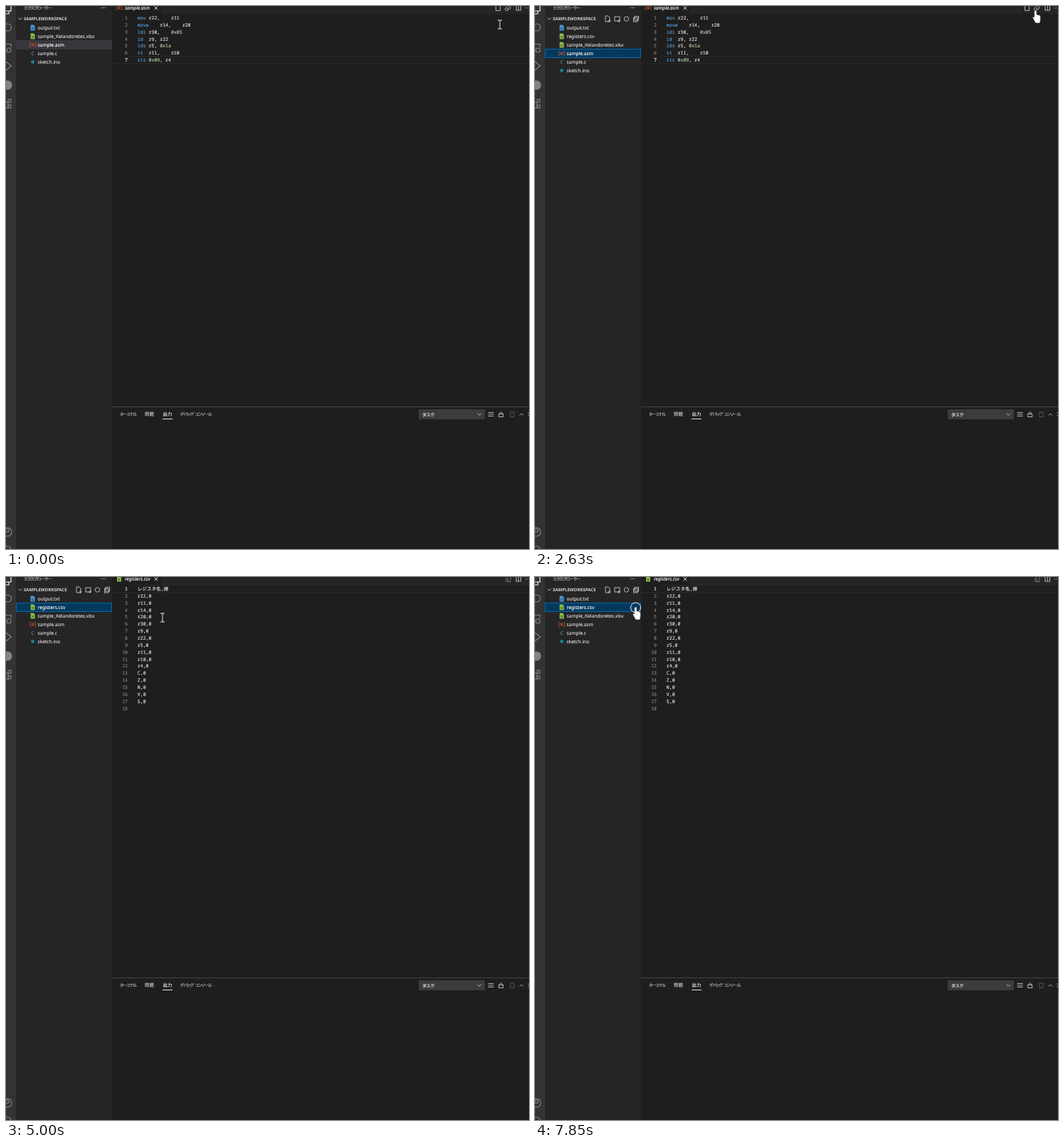
An HTML page for the animation above (8 s loop, 735 by 762 pixels).

```html
<!DOCTYPE html>
<html lang="ja">
<head>
<meta charset="utf-8">
<title>Editor session</title>
<style>
  html, body { margin: 0; width: 100%; height: 100%; overflow: hidden; background: #1e1e1e; }
  svg { display: block; width: 735px; height: 762px; }
  text { font: 6.6px "Noto Sans", "Open Sans", sans-serif; color: #d8d8d8; fill: currentColor;
         stroke: currentColor; stroke-width: .15px; white-space: pre; text-rendering: geometricPrecision; }
  tspan { fill: currentColor; stroke: currentColor; }
  .jp { font-family: "Noto Sans CJK JP", "Noto Sans CJK", sans-serif; font-feature-settings: "palt";
        font-size: 5.9px; letter-spacing: -.7px; word-spacing: 1.4px; color: #c0c0c0; }
  .full { font-size: 6.4px; letter-spacing: 0; }
  .tip { font-size: 9.8px; letter-spacing: -1.9px; color: #eee; }
  .tip tspan { letter-spacing: 0; }
  .head { font-weight: 700; font-size: 6.05px; stroke: none; }
  .code { font-family: "Noto Sans Mono", "DejaVu Sans Mono", "Noto Sans CJK JP", monospace;
          font-size: 6.56px; color: #e4e4e4; }
  .num { color: #858585; text-anchor: end; }
  .tab { font-style: italic; }
  .lit { color: #fff; }
  .kw { color: #569cd6; }
  .hex { color: #b5cea8; }
  .c { color: #519aba; text-anchor: middle; }
  .icon { fill: none; stroke: #c5c5c5; stroke-width: .9; }
  .side { fill: none; stroke: #858585; stroke-width: 1.1; }
  .dots { fill: none; stroke: #c5c5c5; stroke-width: 1.3; stroke-linecap: round; stroke-dasharray: 0 2.6; }
</style>
</head>
<body>
<svg viewBox="0 0 735 762" xmlns="http://www.w3.org/2000/svg">
  <defs>
    <path id="page" d="M-3 -4H1L3 -2V4H-3Z"/>
    <path id="chevron" d="M-2.5 -1.5L0 1L2.5 -1.5"/>
    <path id="cross" d="M-2.4 -2.4L2.4 2.4M2.4 -2.4L-2.4 2.4"/>
    <path id="dots" class="dots" d="M-2.6 0H3"/>
    <path id="plus" d="M-2 0H2M0 -2V2"/>
    <g id="txt"><use href="#page" fill="#4a97dc"/><path d="M-1.5 0H1.5M-1.5 2H1.5" stroke="#252526" stroke-width=".7"/></g>
    <g id="sheet"><use href="#page" fill="#8dc149"/><use href="#cross" transform="translate(0 1) scale(.7)" stroke="#252526"/></g>
    <path id="asm" d="M-2.4 -3H-4V3H-2.4M2.4 -3H4V3H2.4M-1 -2V2M1 -2V2M-2 -1H2M-2 1H2" fill="none" stroke="#d0512f" stroke-width=".75"/>
    <circle id="ino" r="2.4" fill="#1a858d"/>
    <text id="c" class="c" y="2.4">C</text>
  </defs>
  <g id="base"></g>
  <rect id="hover" x="14" width="135" height="12" fill="#2a2d2e"/>
  <rect id="pick" x="14.5" width="134" height="12"/>
  <g id="files"></g>
  <g id="tools" class="icon"></g>
  <g id="asmView"></g>
  <g id="csvView"></g>
  <g id="frame"></g>
  <g id="tip">
    <rect x="686.5" y="18.5" width="60" height="19" fill="#252526" stroke="#c8c8c8"/>
    <text class="jp tip" x="692" y="31.6">デバッグ<tspan>開始</tspan></text>
  </g>
  <g id="pointer">
    <path id="beam" d="M-3 -6H3M0 -6V6M-3 6H3" fill="none" stroke="#e8e8e8"/>
    <path id="hand" d="M-1.8 0Q0 -2 1.5 0V5L6 6Q7 7 7 9V12L6 17H0L-4 10Q-4 8 -3 8L-1.8 9Z" fill="#fff" stroke="#222" stroke-width=".6"/>
    <circle id="ring" r="7" fill="none" stroke="#f4f4f4"/>
  </g>
</svg>
<script>
const $ = id => document.getElementById(id);
const show = (id, on) => $(id).setAttribute('visibility', on ? 'visible' : 'hidden');
const label = (cls, x, y, s) => `<text class="${cls}" x="${x}" y="${y}">${s}</text>`;
const fill = (x, y, w, h, c) => `<rect x="${x}" y="${y}" width="${w}" height="${h}" fill="${c}"/>`;
const box = (x, y, w, h = w) => `<rect x="${x}" y="${y}" width="${w}" height="${h}"/>`;
const ring = (x, y, r) => `<circle cx="${x}" cy="${y}" r="${r}"/>`;
const path = d => `<path d="${d}"/>`;
const use = (id, x, y, turn = 0) => `<use href="#${id}" transform="translate(${x} ${y}) rotate(${turn})"/>`;
const group = (cls, ...parts) => `<g class="${cls}">${parts.join('')}</g>`;

const LINE = 9.86, ROW = 12, ROW_TOP = 24.5, STEP = 120;

$('base').innerHTML = fill(0, 0, 14, 762, '#333') + fill(14, 0, 135, 762, '#252526') +
  fill(218, 0, 517, 11, '#252526') +
  group('side',
    '<path d="M0 -2H7V7H0M4 7V11H0" stroke="#fff"/>',
    ring(2.5, 30, 5),
    path('M0 53.5H7V58'), ring(4, 62, 3),
    path('M0 78L7.5 84L0 90'),
    '<circle cx="2" cy="111" r="6" fill="#858585"/>',
    box(-1, 135, 4, 8), box(3, 139, 4), box(3, 131, 4),
    ring(2, 738, 6), ring(2, 736, 2.3), ring(2, 763, 5)) +
  label('jp', 25, 4.6, 'エクスプローラー') + use('dots', 137, 2.5) +
  group('icon', use('chevron', 20, 18)) + label('head', 25, 19.8, 'SAMPLEWORKSPACE');

$('tools').innerHTML = use('page', 102, 18) + use('plus', 104.5, 21) +
  box(112, 15, 7, 6) + use('plus', 118, 21) + ring(128.5, 18, 3.2) +
  box(140, 14.5, 5.5) + box(138.5, 16.5, 5.5);

const panel = [['', 160, 'ターミナル'], ['full', 195, '問題'], ['full lit', 220.5, '出力'],
  ['', 245, 'デバッグ コンソール']];
$('frame').innerHTML = group('icon', '<use href="#cross" x="211" y="2.8" stroke="#fff"/>',
    box(717, -1, 6.5, 7), path('M720.3 -1V6')) + use('dots', 733, 2.8) +
  fill(149, 562, 586, 1, '#434343') + fill(220, 579, 14, 1, '#e7e7e7') +
  panel.map(([cls, x, s]) => label('jp ' + cls, x, 575, s)).join('') +
  fill(580, 566, 93, 14, '#3c3c3c') + label('jp full lit', 585, 575.6, 'タスク') +
  group('icon',
    use('chevron', 665.3, 573.3), use('chevron', 724.3, 573, 180), use('chevron', 735, 573, -90),
    ...[570.5, 573, 575.5].map(y => path(`M677.5 ${y}h8`)),
    box(692.7, 572.5, 6, 4), path('M694 572.5V571Q695.7 568 697.4 571V572.5'),
    `<g opacity=".35">${box(709, 570, 5, 6.5)}</g>`);

const asmCode = ['mov r22,    r11', 'movw    r14,    r20', 'ldi r30,    0x05', 'ld  r9, r22',
  'lds r5, 0x1a', 'st  r11,    r10', 'sts 0x09, r4'];
const csvCode = ['レジスタ名,値',
  ...'r22 r11 r14 r20 r30 r9 r22 r5 r11 r10 r4 C Z N V S'.split(' ').map(r => r + ',0'), ''];

const paint = s => s.replace(/0x\w+/g, '<tspan class="hex">$&</tspan>')
  .replace(/^[a-z]+(?= )/, '<tspan class="kw">$&</tspan>');

function editor(icon, title, lines, current) {
  const top = 11.6 + current * LINE;
  return use(icon, 159, 2.5) + label('tab lit', 167, 5, title) +
    `<path d="M175 ${top}H735M149 ${top + LINE}H735" stroke="#2a2a2a"/>` +
    lines.map((s, i) => {
      const y = 19 + i * LINE;
      return label('code num' + (i === current ? ' lit' : ''), 171, y, i + 1) +
        label('code', 184.8, y, paint(s));
    }).join('');
}

const bug = path('M704 1V-1.5L709.5 2.5L705.5 5.5') + ring(703.5, 4.5, 2);
$('asmView').innerHTML = editor('asm', 'sample.asm', asmCode, 6) +
  group('icon', use('page', 691.5, 2.5), bug);
$('csvView').innerHTML = editor('sheet', 'registers.csv', csvCode, 0) +
  `<g class="icon" opacity=".55">${path('M702.5 0H705M709 -1V6.5H704') + ring(704, 4, 1.8)}</g>`;

const files = [['txt', 'output.txt'], ['sheet', 'registers.csv'], ['sheet', 'sample_Kelandoretes.xlsx'],
  ['asm', 'sample.asm'], ['c', 'sample.c'], ['ino', 'sketch.ino']];
$('files').innerHTML = files.map(([icon, name]) =>
  group('', use(icon, 37.6, 6), label('', 44.6, 8.1, name))).join('');
const rows = [...$('files').children];

// Pointer moves: start time, steps, end point, optional bend point
const moves = [
  { at: 120, n: 7, to: [703.5, 7] },
  { at: 3010, n: 7, to: [212, 78], bend: [468, 112] },
  { at: 3860, n: 7, to: [133, 46], bend: [145, 62] },
  { at: 4880, n: 2, to: [220, 57] },
  { at: 5140, n: 3, to: [285, 83] },
  { at: 5520, n: 1, to: [290, 88] },
  { at: 5900, n: 2, to: [264, 84] },
  { at: 6410, n: 7, to: [168, 53] },
  { at: 7250, n: 6, to: [141.5, 43] }
];

function pointerAt(t) {
  let pos = [694, 26];
  for (const { at, n, to, bend } of moves) {
    if (t < at) break;
    const p = Math.min(1, (Math.floor((t - at) / STEP) + 1) / n);
    const e = p * p * (3 - 2 * p);
    pos = pos.map((from, i) => {
      const mid = bend ? bend[i] : (from + to[i]) / 2;
      return (1 - e) ** 2 * from + 2 * e * (1 - e) * mid + e * e * to[i];
    });
  }
  return pos;
}

function draw(t) {
  const [x, y] = pointerAt(t);
  const overSide = x < 149, hand = overSide || y < 11;
  const added = t >= 2630, opened = t >= 4740, focus = t >= 2100;
  const slot = i => ROW_TOP + ROW * (i > 1 && !added ? i - 1 : i);
  const selected = opened ? 1 : 3;

  $('pointer').setAttribute('transform', `translate(${x} ${y})`);
  show('hand', hand);
  show('beam', !hand);
  show('ring', (t >= 1860 && t < 1980) || t >= 7850);
  show('tip', t >= 1350 && t < 1980);
  show('tools', focus);
  show('asmView', !opened);
  show('csvView', opened);

  rows.forEach((row, i) => {
    row.setAttribute('transform', `translate(0 ${slot(i)})`);
    row.setAttribute('visibility', i === 1 && !added ? 'hidden' : 'visible');
    row.lastChild.classList.toggle('lit', i === selected);
  });
  const pick = $('pick');
  pick.setAttribute('y', slot(selected));
  pick.setAttribute('fill', focus ? '#04395e' : '#37373d');
  pick.setAttribute('stroke', focus ? '#0268ae' : '#37373d');
  $('hover').setAttribute('y', ROW_TOP + ROW * Math.floor((y - ROW_TOP) / ROW));
  show('hover', overSide);
}

function tick() {
  draw(performance.now() % 8000);
  requestAnimationFrame(tick);
}
tick();
</script>
</body>
</html>
```
